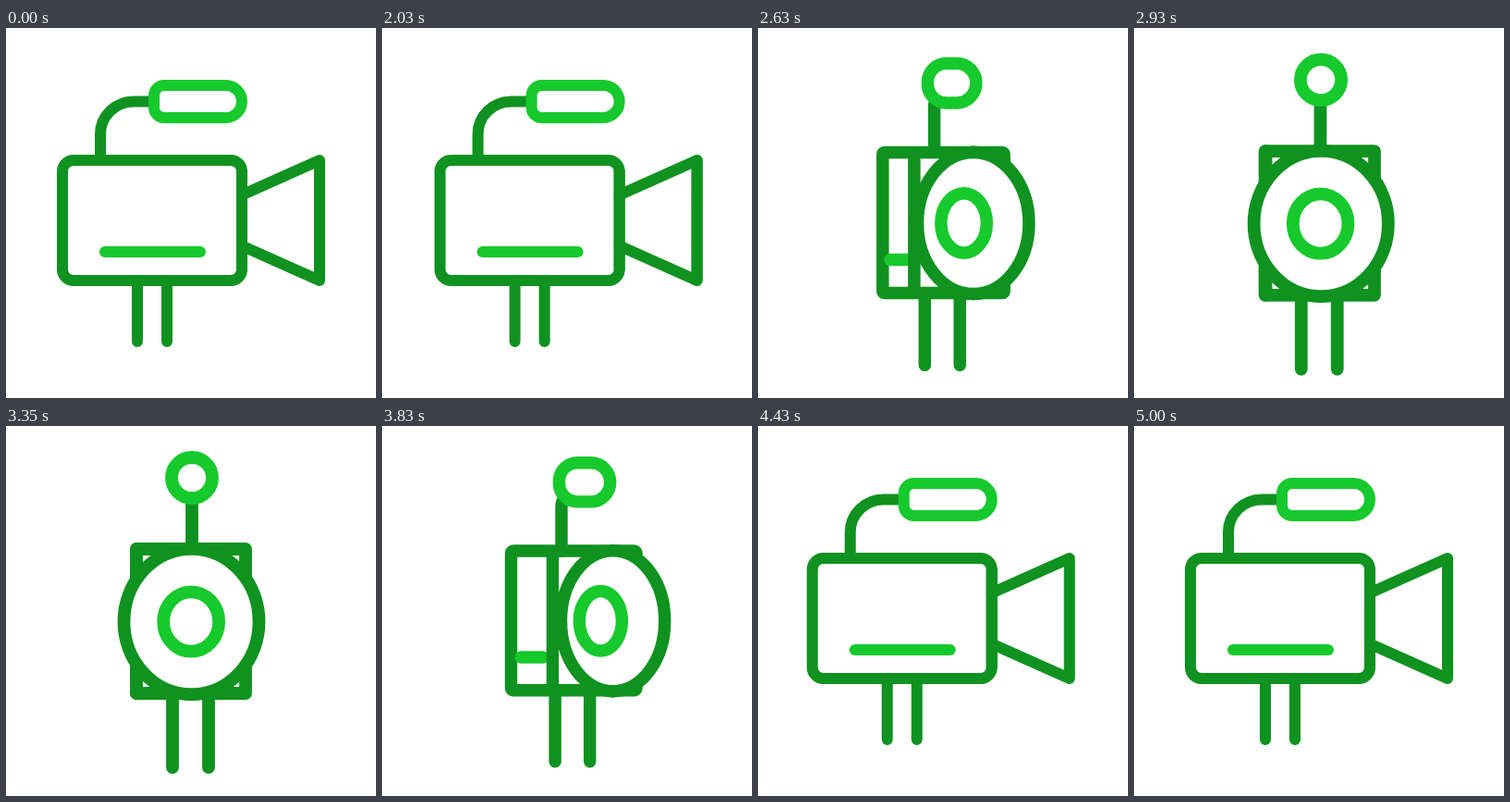
Write an HTML page that moves like this. It is 400 by 400 pixels and loops after 5030 ms.

```html
<!DOCTYPE html>
<html lang="en">
<head>
<meta charset="utf-8">
<title>Video camera</title>
<style>
  html, body { margin: 0; width: 100%; height: 100%; overflow: hidden; background: #fff; }
  svg { display: block; width: 100vw; height: 100vh; }
  .dark, .light { fill: none; stroke-linecap: round; stroke-linejoin: round; }
  .dark { stroke: #109220; }
  .light { stroke: #16c92c; }
  .solid { fill: #fff; }
</style>
</head>
<body>
<svg viewBox="0 0 400 400">
  <clipPath id="opening"><ellipse id="hole"/></clipPath>
  <g id="camera">
    <path id="handle" class="dark"/>
    <path id="mic" class="light solid"/>
    <path id="legs" class="dark"/>
    <rect id="body" class="dark"/>
    <path id="label" class="light"/>
    <path id="divider" class="dark"/>
    <path id="cone" class="dark"/>
    <ellipse id="lens" class="dark solid"/>
    <g clip-path="url(#opening)"><ellipse id="glass" class="light"/></g>
  </g>
</svg>
<script>
const LOOP = 5030, STEP = 30;
const OPEN = 2025, CLOSE = 4390, TURN_TIME = 1080;

const part = {};
document.querySelectorAll('svg [id]').forEach(el => part[el.id] = el);
const set = (id, attrs) => {
  for (const name in attrs) part[id].setAttribute(name, attrs[name]);
};

const clamp = u => Math.min(1, Math.max(0, u));
const ease = u => 1 - (1 - clamp(u) ** 1.7) ** 4;
const lobe = (t, from, to, peak, skew = 1) =>
  peak * Math.sin(Math.PI * clamp((t - from) / (to - from)) ** skew);

// 0 is the side view, 1 the front view; turning back mirrors turning in
const turn = t => Math.min(ease((t - OPEN) / TURN_TIME), ease((CLOSE - t) / TURN_TIME));

// Sideways sway: out to the right, then a small overshoot to the left, for each turn
const sway = t =>
  lobe(t, OPEN, 2985, 9.5, 0.55) + lobe(t, 2985, 3350, -2) +
  lobe(t, 3480, 4330, 15.5) + lobe(t, 4330, 5000, -3.6, 0.8);

function draw(time) {
  const t = time - (time - 20) % STEP;
  const p = turn(t);
  const mix = (side, front) => side + (front - side) * p;
  const bulge = p * (1 - p);
  const open = p ** 1.15;

  set('camera', { transform: `translate(${sway(t)} 0)`, 'stroke-width': mix(12, 13.8) });

  const top = mix(143, 133), bottom = mix(273, 289), corner = mix(12, 0);
  const left = mix(61, 141);
  const edge = mix(255, 141) + 32 * bulge;
  const right = Math.max(edge, mix(255, 259) + 12 * bulge);
  set('body', { x: left, y: top, width: right - left, height: bottom - top, rx: corner });
  set('divider', { d: `M${edge} ${top + corner}V${bottom - corner}` });

  const panel = edge - left;
  set('label', { d: `M${left + 0.237 * panel} ${mix(242, 252)}H${left + 0.768 * panel}` });

  const foot = mix(339, 369);
  set('legs', { d: `M${mix(142, 180)} ${bottom}V${foot}M${mix(174, 219)} ${bottom}V${foot}` });

  const x0 = mix(160, 179) + 9 * bulge, x1 = mix(255, 223) + 14 * bulge;
  const y0 = mix(62, 34), y1 = mix(97, 78);
  const r0 = mix(11, 22), r1 = mix(17.5, 22);
  set('mic', {
    d: `M${x0 + r0} ${y0}H${x1 - r1}A${r1} ${r1} 0 0 1 ${x1} ${y0 + r1}V${y1 - r1}
        A${r1} ${r1} 0 0 1 ${x1 - r1} ${y1}H${x0 + r0}A${r0} ${r0} 0 0 1 ${x0} ${y1 - r0}
        V${y0 + r0}A${r0} ${r0} 0 0 1 ${x0 + r0} ${y0}Z`
  });

  const hx = mix(102, 201) - 10 * bulge, hy = mix(79.5, 77);
  const bend = mix(115, 79), reach = mix(36, 0);
  set('handle', {
    d: `M${hx} ${top}V${bend}C${hx} ${mix(95, 78)} ${hx + reach * 0.45} ${hy} ${hx + reach} ${hy}
        H${Math.max(hx + reach, mix(160, 201))}`
  });

  const cx = mix(339, 200.5) + 36 * bulge, cy = mix(208, 211.5);
  const rx = 73 * open, ry = mix(65, 78.7);
  const face = (edge + right) / 2, neck = mix(27.5, 33);
  set('cone', { d: `M${face} ${cy - neck}L${cx} ${cy - ry}V${cy + ry}L${face} ${cy + neck}` });
  set('lens', { cx, cy, rx, ry });
  set('hole', { cx, cy, rx: Math.max(0, rx - 6.5), ry: ry - 6.5 });
  set('glass', { cx: face + (cx - face) / 3, cy, rx: 30 * open, ry: 32.2 });
}

function tick() {
  draw(performance.now() % LOOP);
  requestAnimationFrame(tick);
}
tick();
</script>
</body>
</html>
```
